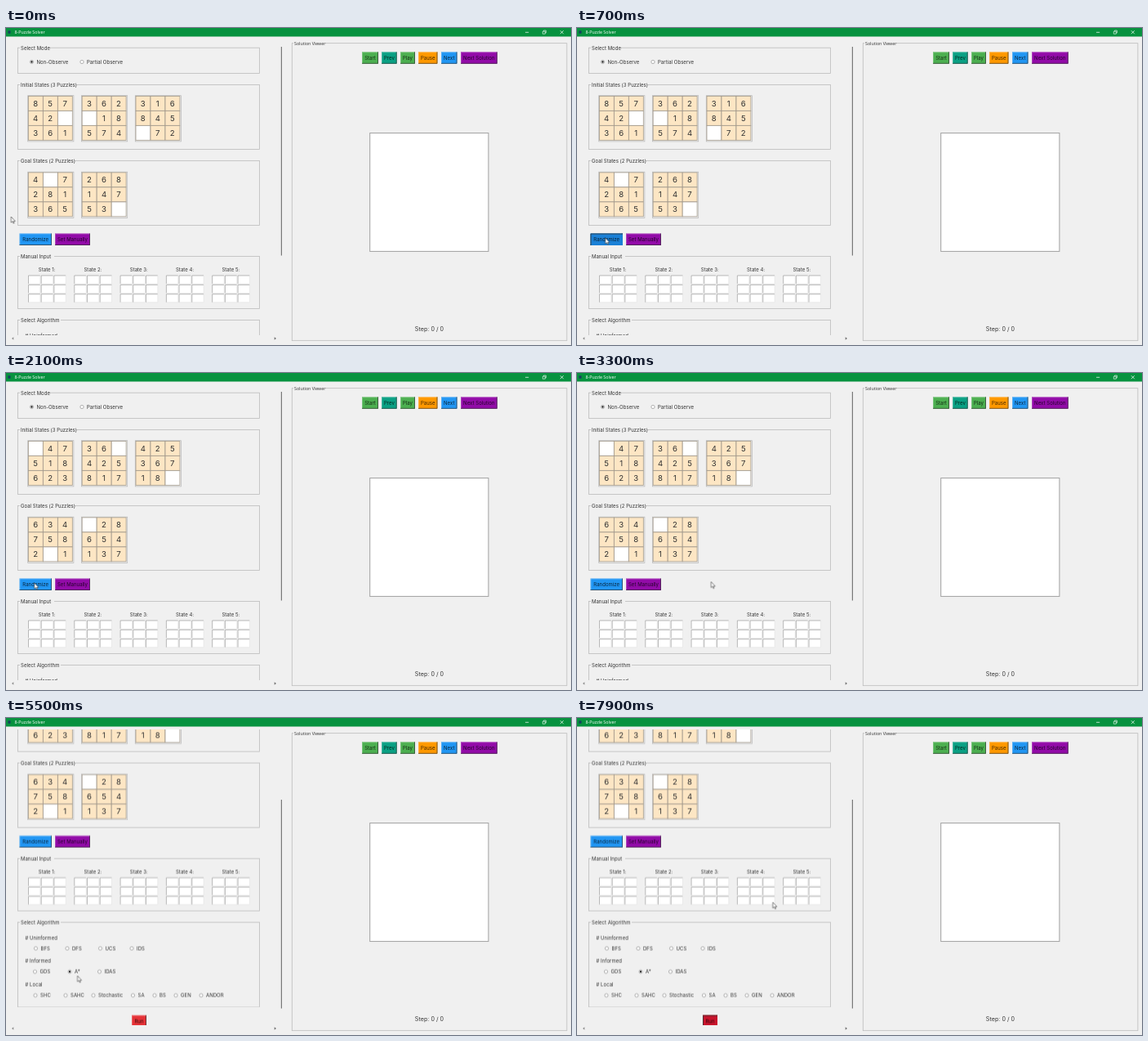
These frames come from a looping animation (692 by 388 pixels, 8 s). An HTML page:

```html
<!DOCTYPE html>
<html lang="en">
<head>
<meta charset="utf-8">
<title>8-Puzzle Solver</title>
<style>
html, body { margin: 0; width: 100%; height: 100%; overflow: hidden; background: #f0f0f0; }
svg { display: block; }
text { font: 6px Inter, "Open Sans", sans-serif; letter-spacing: .04px; fill: #333; white-space: pre; }
.ui { font: 5.3px "Open Sans", sans-serif; letter-spacing: 0; }
.num { font-size: 9.6px; }
.step { font-size: 7.1px; }
.frame { fill: none; stroke: #bcbcbc; stroke-width: .8; }

#scroll, #thumb, #cursor, .before, .after, .press, .bfs, .astar, .run {
  animation: 8s step-end infinite;
}
#scroll { animation-name: scroll; }
#thumb { animation-name: thumb; }
#cursor { animation-name: cursor; }
.before { animation-name: before; }
.after { animation-name: after; }
.press { animation-name: press; }
.bfs { animation-name: bfs; }
.astar { animation-name: astar; }
.run { animation-name: run; }

@keyframes scroll { 0% { transform: none } 51.25%, 100% { transform: translateY(-107.5px) } }
@keyframes thumb { 0% { transform: none } 51.25%, 100% { transform: translateY(77px) } }
@keyframes before { 0% { opacity: 1 } 11.25%, 100% { opacity: 0 } }
@keyframes after { 0% { opacity: 0 } 11.25%, 100% { opacity: 1 } }
@keyframes press { 0% { opacity: 0 } 8.75% { opacity: 1 } 11.25%, 100% { opacity: 0 } }
@keyframes bfs { 0% { opacity: 1 } 62.5%, 100% { opacity: 0 } }
@keyframes astar { 0% { opacity: 0 } 62.5%, 100% { opacity: 1 } }
@keyframes run { 0% { opacity: 0 } 80%, 100% { opacity: 1 } }
@keyframes cursor {
  0% { transform: translate(6.3px, 231px) }
  1.25% { transform: translate(6.3px, 231px); animation-timing-function: steps(5, start) }
  7.5% { transform: translate(34.7px, 257px) }
  41.25% { transform: translate(164.2px, 255.5px) }
  52.5% { transform: translate(164.2px, 255.5px); animation-timing-function: steps(7, start) }
  61.25% { transform: translate(78px, 309px) }
  68.75% { transform: translate(78px, 309px); animation-timing-function: steps(9, start) }
  80% { transform: translate(163.6px, 367.8px) }
  87.5% { transform: translate(190px, 350px) }
  88.75% { transform: translate(225px, 325px) }
  90% { transform: translate(257px, 291px) }
  91.25% { transform: translate(269px, 262px) }
  92.5% { transform: translate(254px, 241px) }
  93.75% { transform: translate(239.8px, 232.3px) }
  98.75%, 100% { transform: translate(239.8px, 225.5px) }
}
</style>
</head>
<body>
<svg id="stage" width="692" height="388" viewBox="0 0 692 388"></svg>
<script>
const rect = (x, y, w, h, fill, extra = '') =>
  `<rect x="${x}" y="${y}" width="${w}" height="${h}" fill="${fill}" ${extra}/>`;
const path = (d, stroke, width = .8, fill = 'none', extra = '') =>
  `<path d="${d}" fill="${fill}" stroke="${stroke}" stroke-width="${width}" ${extra}/>`;
const label = (s, x, y, cls = '', anchor = 'start', extra = '') =>
  `<text x="${x}" y="${y}" class="${cls}" text-anchor="${anchor}" ${extra}>${s}</text>`;
const group = (cls, body) => `<g class="${cls}">${body}</g>`;

function button(s, x, y, w, fill, sunken = false) {
  const h = 14.5;
  const topLeft = `M${x + .5} ${y + h}V${y + .5}H${x + w}`;
  const bottomRight = `M${x + w - .5} ${y}V${y + h - .5}H${x}`;
  const rim = sunken
    ? path(topLeft, '#333', 1, 'none', 'opacity=".8"')
    : path(topLeft, '#fff', .8, 'none', 'opacity=".3"') +
      path(bottomRight, '#333', 1, 'none', 'opacity=".65"');
  return rect(x, y, w, h, fill) + rim +
    label(s, x + w / 2, y + h / 2 + 2.3, '', 'middle', 'style="fill:#000" opacity=".75"');
}

function box(title, y, bottom, width) {
  return rect(14.5, y, 296, bottom - y, 'none', 'class="frame"') +
    rect(17, y - 3, width + 2, 6, '#f0f0f0') + label(title, 18, y + 2.4);
}

// cells: nine characters, 0 marks the gap
function board(cells, x, y) {
  let out = rect(x - .3, y - .3, 56.2, 56.2, '#f4f4f4', 'stroke="#b4b4b4" stroke-width=".7"');
  [...cells].forEach((c, i) => {
    const cx = x + i % 3 * 18, cy = y + Math.floor(i / 3) * 18;
    out += rect(cx + .4, cy + .4, 17.9, 17.9, c === '0' ? '#fff' : '#fde6c4',
      'stroke="#a39a8c" stroke-width=".8"');
    if (c !== '0') out += label(c, cx + 9.2, cy + 12.9, 'num', 'middle');
  });
  return out;
}
const boards = (list, y) => list.map((c, i) => board(c, 27 + i * 65.8, y)).join('');

function radio(s, x, y, cls) {
  const dot = cls ? `<circle cx="${x}" cy="${y}" r="1.15" fill="#111" class="${cls}"/>` : '';
  return `<circle cx="${x}" cy="${y}" r="2.1" fill="#fff" stroke="#808080" stroke-width=".6"/>` +
    dot + label(s, x + 6, y + 2.3);
}

function entries(n) {
  const x = 27.5 + n * 56.3;
  let out = label(`State ${n + 1}:`, x + 22.7, 298.4, '', 'middle');
  for (let i = 0; i < 9; i++) {
    const cx = x + i % 3 * 15.7, cy = 303 + Math.floor(i / 3) * 11.4;
    out += rect(cx, cy, 14.3, 10, '#fff') +
      path(`M${cx} ${cy + 10}V${cy}H${cx + 14.3}`, '#9c9c9c', .7) +
      path(`M${cx + 14.3} ${cy}V${cy + 10}H${cx}`, '#dcdcdc', .5);
  }
  return out;
}

const algorithms = [
  ['# Uninformed', 376.5, 389.5, [['BFS', 36.5, 'bfs'], ['DFS', 75], ['UCS', 115.5], ['IDS', 154]]],
  ['# Informed', 405, 418, [['GDS', 35.5], ['A*', 78, 'astar'], ['IDAS', 114.5]]],
  ['# Local', 433.5, 447, [['SHC', 36], ['SAHC', 73], ['Stochastic', 107], ['SA', 155.5],
    ['BS', 182], ['GEN', 208], ['ANDOR', 239]]],
].map(([title, y, rowY, items]) => label(title, 23.5, y + 2.2) +
  items.map(([s, x, cls]) => radio(s, x, rowY, cls)).join('')).join('');

const content =
  box('Select Mode', 24.2, 55.5, 35) +
  radio('Non-Observe', 31.5, 41.5, 'on') + radio('Partial Observe', 93, 41.5) +
  box('Initial States (3 Puzzles)', 69.5, 148.5, 67) +
  box('Goal States (2 Puzzles)', 162.5, 241.5, 65) +
  group('before', boards(['857420361', '362018574', '316845072'], 83) +
    boards(['407281365', '268147530'], 176.5)) +
  group('after', boards(['047518623', '360425817', '425367180'], 83) +
    boards(['634758201', '028654137'], 176.5)) +
  button('Randomize', 16.5, 251.5, 39.5, '#2196f3') +
  group('press', button('Randomize', 16.5, 251.5, 39.5, '#1a80d6', true)) +
  button('Set Manually', 60, 251.5, 43, '#920ba8') +
  box('Manual Input', 279.5, 343.5, 40) +
  [0, 1, 2, 3, 4].map(entries).join('') +
  box('Select Algorithm', 357.5, 461.5, 48) + algorithms +
  button('Run', 154, 471.3, 18, '#e53237') +
  group('run', button('Run', 154, 471.3, 18, '#c8142c', true));

const titleBar =
  rect(0, 0, 692, 10.5, '#07923f') + rect(2.5, 3.3, 3, 3.4, '#173f5f') +
  label('8-Puzzle Solver', 10.5, 7.1, 'ui', 'start', 'style="fill:#fff"') +
  path('M636 5.3h4.2', '#fff', .7) +
  path('M657.3 4.2h3v3h-3zM658.4 4v-1h3v3h-1', '#fff', .6) +
  path('M678.8 3.2l4 4m0-4l-4 4', '#fff', .7);

const viewer =
  rect(350.3, 18.7, 336.6, 364, 'none', 'class="frame"') +
  rect(352, 16, 39, 6, '#f0f0f0') + label('Solution Viewer', 353, 20.6, 'ui') +
  [['Start', 436, 20, '#4caf50'], ['Prev', 460, 18.7, '#0aa083'], ['Play', 483, 18, '#4caf50'],
    ['Pause', 505, 23.5, '#ff9800'], ['Next', 533, 19.5, '#2196f3'],
    ['Next Solution', 557, 44.7, '#920ba8']]
    .map(([s, x, w, fill]) => button(s, x, 29.3, w, fill)).join('') +
  rect(445.7, 128.6, 145.2, 144.8, '#fff', 'stroke="#a0a0a0" stroke-width="1"') +
  label('Step: 0 / 0', 518.5, 370.5, 'step', 'middle');

const bars =
  rect(336.8, 23, 1.2, 255.5, '#777', 'id="thumb"') +
  path('M9.3 378.2v3.6l-2.3-1.8z', 'none', 0, '#909090') +
  path('M328.7 378.2v3.6l2.3-1.8z', 'none', 0, '#707070');

document.getElementById('stage').innerHTML =
  rect(0, 0, 692, 388, '#f0f0f0') +
  `<svg y="14" width="334" height="362" viewBox="0 14 334 362"><g id="scroll">${content}</g></svg>` +
  viewer + bars + titleBar +
  `<g id="cursor">${path('M0 0V7.2L1.7 5.7L2.8 8.2L3.8 7.8L2.8 5.4H5Z', '#333', .6, '#fff')}</g>`;
</script>
</body>
</html>
```
